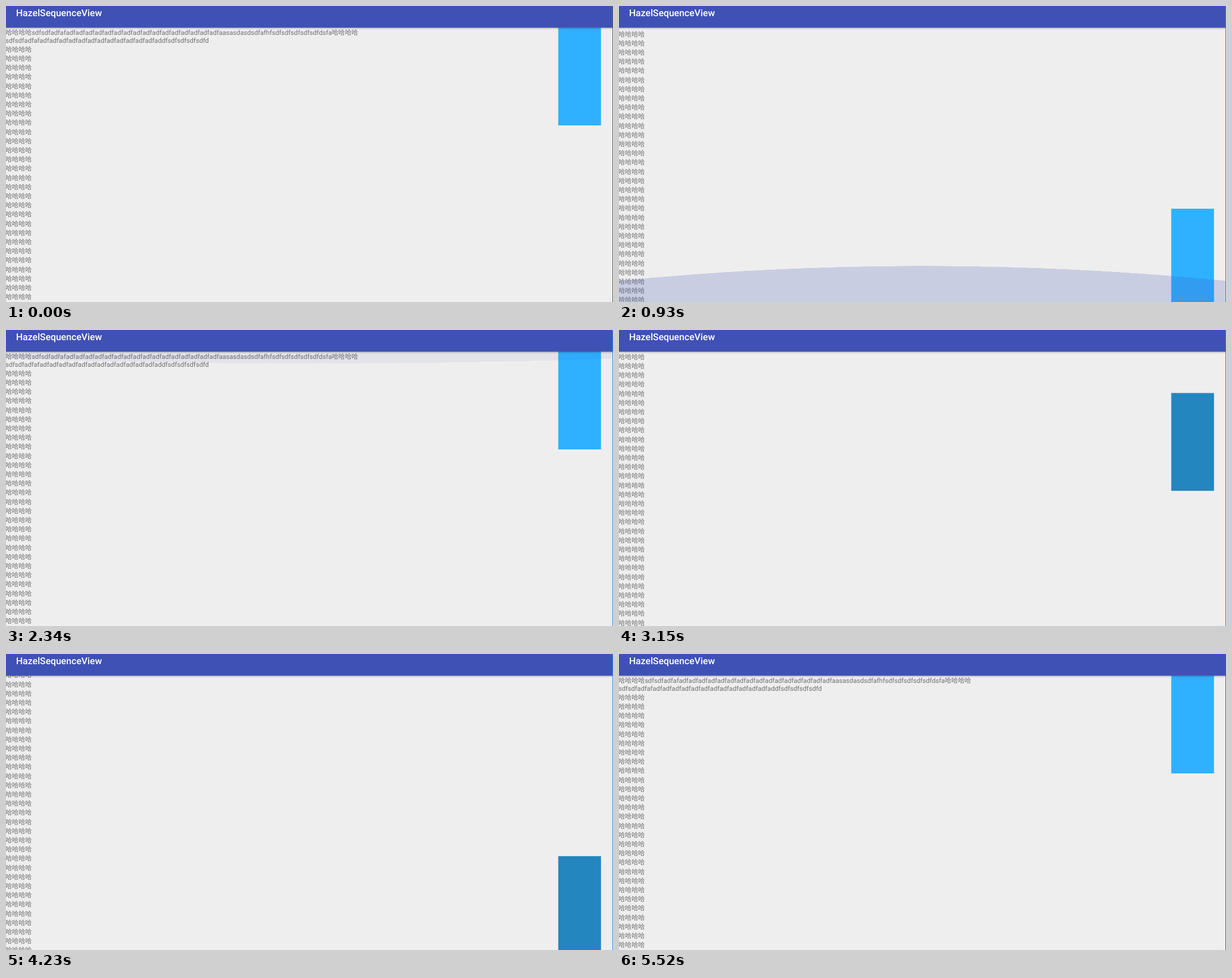
Recreate the animation shown at these times as an HTML page. Size 1071 by 523 pixels, loop 5640 ms.

```html
<!DOCTYPE html>
<html lang="zh-CN">
<head>
<meta charset="utf-8">
<title>HazelSequenceView</title>
<style>
html, body { margin: 0; width: 100%; height: 100%; overflow: hidden; background: #eee; }
svg { display: block; width: 1071px; height: 523px; }
text { font-family: Roboto, "Noto Sans CJK SC", sans-serif; text-rendering: geometricPrecision; white-space: pre; }
#rows { font-size: 11.6px; fill: #6f6f6f; }
.title { font-size: 16.57px; font-weight: 500; fill: #fff; }

#rows, #thumb, .glow, #edge { animation: 5640ms linear infinite; }
#rows { animation-name: scroll; }
#thumb { animation-name: slide, press; }
#edge { animation-name: edge; }
.glow { fill: #3f51b5; opacity: 0; }
.low { animation-name: glow-low; }
.high { animation-name: glow-high; }

/* fling down, fling up, then a drag of the thumb both ways */
@keyframes scroll {
  0% { transform: translateY(0); }
  6.21% { transform: translateY(0); animation-timing-function: cubic-bezier(.33, 0, .67, .33); }
  12.71%, 27.39% { transform: translateY(-1144.9px); animation-timing-function: cubic-bezier(.33, 0, .67, .31); }
  33.51% { transform: translateY(-159.9px); }
  33.99% { transform: translateY(0); }
  52.57% { transform: translateY(0); animation-timing-function: cubic-bezier(.33, 0, .67, .63); }
  55.85% { transform: translateY(-270.3px); animation-timing-function: cubic-bezier(.33, .37, .67, .78); }
  64.36% { transform: translateY(-1048.9px); animation-timing-function: cubic-bezier(.33, .96, .67, 1); }
  69.5%, 74.73% { transform: translateY(-1144.9px); animation-timing-function: cubic-bezier(.33, 0, .67, .69); }
  80.85% { transform: translateY(-268.6px); animation-timing-function: cubic-bezier(.33, .58, .67, 1); }
  84.04%, 100% { transform: translateY(0); }
}
@keyframes slide {
  0% { transform: translateY(0); }
  6.21% { transform: translateY(0); animation-timing-function: cubic-bezier(.33, 0, .67, .33); }
  12.71%, 27.39% { transform: translateY(320px); animation-timing-function: cubic-bezier(.33, 0, .67, .31); }
  33.51% { transform: translateY(40px); }
  33.99% { transform: translateY(0); }
  52.57% { transform: translateY(0); animation-timing-function: cubic-bezier(.33, 0, .67, .63); }
  55.85% { transform: translateY(72.6px); animation-timing-function: cubic-bezier(.33, .37, .67, .78); }
  64.36% { transform: translateY(291.8px); animation-timing-function: cubic-bezier(.33, .96, .67, 1); }
  69.5%, 74.73% { transform: translateY(320px); animation-timing-function: cubic-bezier(.33, 0, .67, .69); }
  80.85% { transform: translateY(72px); animation-timing-function: cubic-bezier(.33, .58, .67, 1); }
  84.04%, 100% { transform: translateY(0); }
}
@keyframes press {
  0%, 88.83%, 100% { fill: #2fb1ff; animation-timing-function: step-end; }
  52.659% { fill: #2386bf; animation-timing-function: step-end; }
}
@keyframes edge {
  0%, 97.872%, 100% { fill: #5a5a5a; animation-timing-function: step-end; }
  6.383% { fill: #3b82d0; animation-timing-function: step-end; }
}
/* overscroll glow: quick growth, then a slower retreat */
@keyframes glow-low {
  0%, 12.7% { transform: scaleY(0); opacity: 0; }
  12.71% { transform: scaleY(0); opacity: .09; animation-timing-function: cubic-bezier(.33, .67, .67, 1); }
  14.68% { transform: scaleY(.419); opacity: .305; animation-timing-function: cubic-bezier(.33, .67, .67, 1); }
  25.32%, 100% { transform: scaleY(0); opacity: 0; }
}
@keyframes glow-high {
  0%, 33.98% { transform: scaleY(0); opacity: 0; }
  33.99% { transform: scaleY(0); opacity: .09; animation-timing-function: cubic-bezier(.33, .67, .67, 1); }
  35.96% { transform: scaleY(.419); opacity: .305; animation-timing-function: cubic-bezier(.33, .67, .67, 1); }
  46.6%, 100% { transform: scaleY(0); opacity: 0; }
}
</style>
</head>
<body>
<svg viewBox="0 0 1071 523">
  <defs>
    <linearGradient id="shade" x1="0" y1="0" x2="0" y2="1">
      <stop offset="0" stop-color="#000" stop-opacity=".34"/>
      <stop offset=".4" stop-color="#000" stop-opacity=".12"/>
      <stop offset="1" stop-color="#000" stop-opacity="0"/>
    </linearGradient>
  </defs>
  <rect width="1071" height="523" fill="#eee"/>
  <g id="rows"></g>
  <rect id="thumb" x="974.4" y="38.2" width="75.4" height="172.8" fill="#2fb1ff"/>
  <g transform="translate(535.5 523)"><circle class="glow low" cy="1385" r="1607"/></g>
  <g transform="translate(535.5 38) scale(1 -1)"><circle class="glow high" cy="1385" r="1607"/></g>
  <rect y="38" width="1071" height="4" fill="url(#shade)"/>
  <rect width="1071" height="38.2" fill="#3f51b5"/>
  <text class="title" x="17.8" y="17.5">HazelSequenceView</text>
  <rect id="edge" x="1070" width="1" height="523" fill="#5a5a5a"/>
</svg>
<script>
const rows = document.getElementById('rows');
const ha = '哈'.repeat(4);
const lead = 'sdfsdfadfaf';

function addLine(y, str) {
  const el = document.createElementNS('http://www.w3.org/2000/svg', 'text');
  el.setAttribute('x', -1);
  el.setAttribute('y', y.toFixed(2));
  el.textContent = str;
  rows.append(el);
}

addLine(51.2, ha + lead + 'adf'.repeat(16) + 'aasasdasdsdfafhf' + 'sdf'.repeat(5) + 'dsfa' + ha);
addLine(64.6, lead + 'adf'.repeat(12) + 'addf' + 'sdf'.repeat(4) + 'd');
for (let i = 0; i < 99; i++) addLine(80.7 + 16.2 * i, ha);
</script>
</body>
</html>
```
